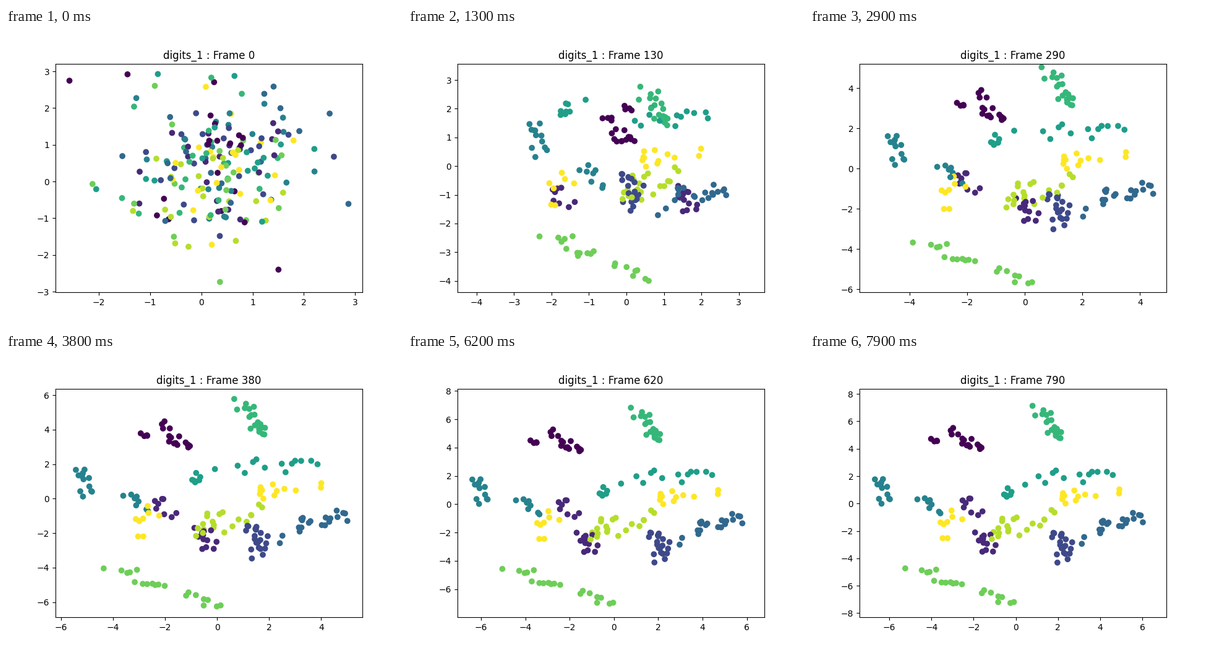
A matplotlib script that plays this animation: 640x480 px, repeating every 8 s.

```python
import numpy as np
import matplotlib.pyplot as plt
from matplotlib.animation import FuncAnimation

STEP, FRAMES = 10, 80
PER_DIGIT = 20
SETTLED, LAST = 130, 790
rng = np.random.default_rng(11)

# The view (left, right, bottom, top) grows along S-curves.
VIEW_START = np.array([-2.84, 3.14, -3.02, 3.21])
VIEW_GROWTH = np.array([-5.3, 4.2, -5.5, 5.2])
VIEW_TIME = np.array([375, 411, 329, 390])
VIEW_POWER = np.array([0.92, 1.72, 1.34, 2.4])

# Clusters of each digit, the larger one first:
# centre once settled, centre at the end, half length of the streak.
CLUSTERS = [
    [((-0.1, 1.0), (-2.1, 4.3), (0.4, -0.2)),
     ((-0.2, 1.9), (-3.3, 4.9), (0.9, 0.7))],
    [((1.7, -1.3), (-1.4, -2.9), (0.3, -0.7)),
     ((-1.8, -1.3), (-2.0, -0.4), (0.3, -0.5))],
    [((0.1, -0.9), (2.2, -3.0), (0.3, -1.2))],
    [((2.4, -1.1), (5.3, -1.3), (0.8, 0.3)),
     ((1.4, -1.2), (4.0, -1.9), (0.5, 1.2))],
    [((-2.6, 1.0), (-6.4, 1.0), (0.1, -1.2)),
     ((-1.2, -0.2), (-4.4, 0.2), (0.8, -0.7))],
    [((1.2, 1.8), (2.8, 2.1), (1.5, 0.2)),
     ((-1.6, 2.2), (-0.2, 1.0), (0.6, 0.9))],
    [((0.85, 2.1), (1.6, 5.8), (0.5, -1.3))],
    [((-0.9, -3.3), (-2.6, -5.9), (2.6, -1.3))],
    [((0.2, -0.9), (-0.6, -2.0), (0.5, 1.1)),
     ((1.0, -0.7), (1.0, -1.5), (0.8, 0.8))],
    [((1.4, 0.4), (3.8, 0.7), (1.8, 0.2)),
     ((-1.9, -0.8), (-3.1, -1.4), (0.2, 1.3))],
]


def view(t):
    return VIEW_START + VIEW_GROWTH * (1 - np.exp(-(t / VIEW_TIME) ** VIEW_POWER))


def scatter_start(n):
    """Normal cloud stretched to fill the first view up to its 5% margin."""
    low, high = VIEW_START[::2], VIEW_START[1::2]
    pad = (high - low) / 22
    cloud = rng.standard_normal((n, 2))
    unit = (cloud - cloud.min(axis=0)) / np.ptp(cloud, axis=0)
    return low + pad + unit * (high - low - 2 * pad)


def deal_dots():
    """Three in five dots go to a digit's larger cluster."""
    dots = []
    for digit, parts in enumerate(CLUSTERS):
        for i in range(PER_DIGIT):
            early, late, streak = parts[0] if i % 5 < 3 else parts[-1]
            offset = rng.uniform(-1, 1) * np.array(streak) + rng.normal(0, 0.22, 2)
            dots.append((digit, *early, *late, *offset))
    return rng.permutation(dots)


table = deal_dots()
digits = table[:, 0]
early, late, offset = table[:, 1:3], table[:, 3:5], table[:, 5:7]
start = scatter_start(len(digits))


def drift(t):
    """Slowing progress: 0 once the clusters are settled, 1 at the end."""
    return (1 - np.exp((SETTLED - t) / 250)) / (1 - np.exp((SETTLED - LAST) / 250))


def positions(t):
    p = drift(t)
    home = early + (late - early) * p + offset * (0.6 + 0.4 * p)
    return home + (start - home) * np.exp(-t / 45)


fig, ax = plt.subplots(figsize=(6.4, 4.8), dpi=100)
dots = ax.scatter(*start.T, c=digits, cmap="viridis", vmin=0, vmax=9)
title = ax.set_title("")


def update(frame):
    t = frame * STEP
    left, right, bottom, top = view(t)
    ax.set_xlim(left, right)
    ax.set_ylim(bottom, top)
    dots.set_offsets(positions(t))
    title.set_text(f"digits_1 : Frame {t}")
    return dots, title


anim = FuncAnimation(fig, update, frames=FRAMES, interval=100,
                     repeat=True, repeat_delay=0, blit=False)
plt.show()
```
